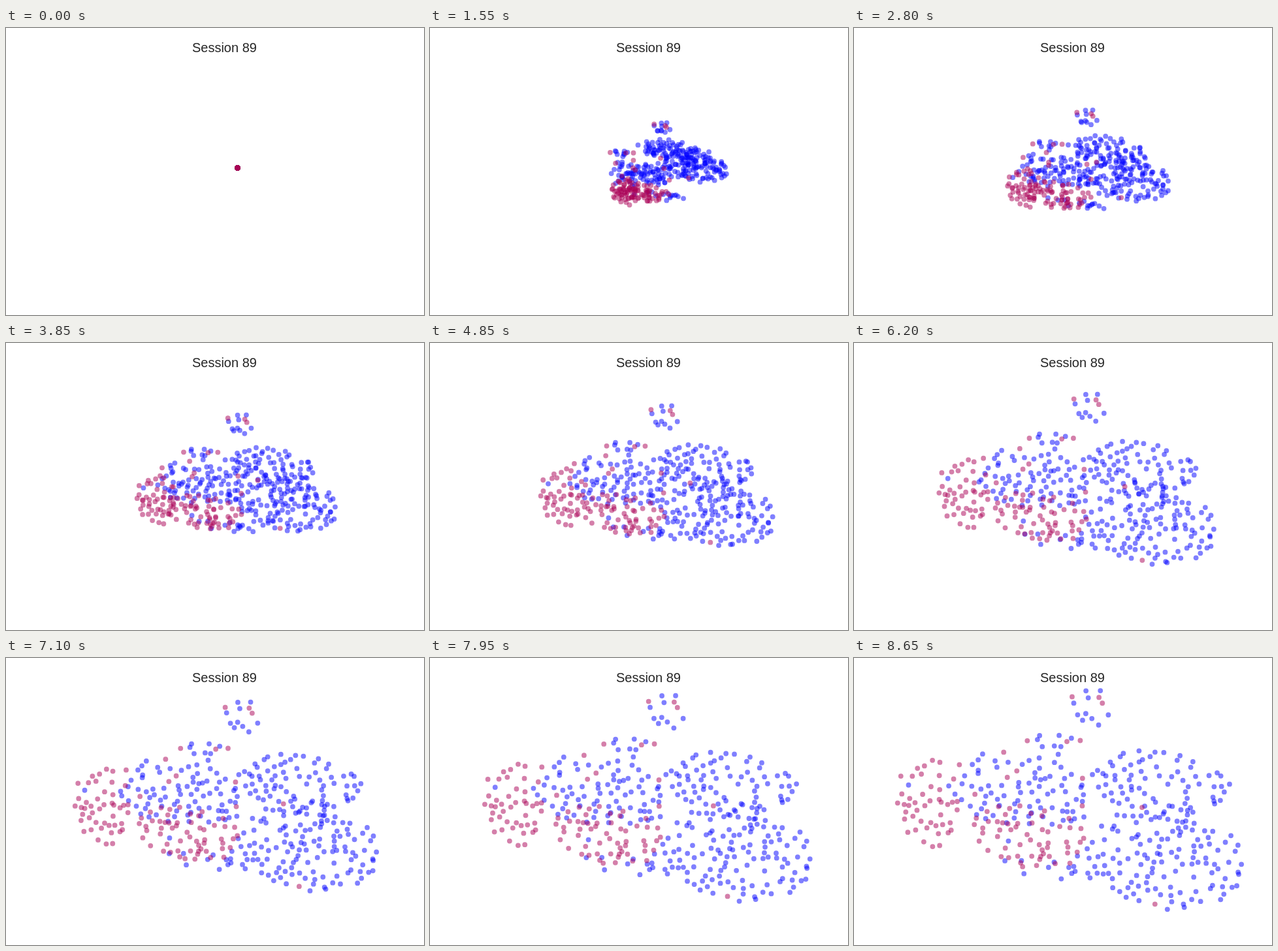
These frames come from a looping animation (640x440 px, 8700 ms). An HTML page with a canvas:

```html
<!DOCTYPE html>
<html lang="en">
<head>
<meta charset="utf-8">
<title>Session 89</title>
<style>
  html, body { margin: 0; width: 100%; height: 100%; overflow: hidden; background: #fff; }
  canvas { display: block; }
</style>
</head>
<body>
<canvas id="stage" width="640" height="440"></canvas>
<script>
const ctx = document.getElementById('stage').getContext('2d');
const LOOP = 8700, STEP = 50, HOLD = 150;
const SETTLED = 1550, END = 8650;
const ORIGIN = { x: 354.5, y: 214.5 };
const BLUE = '#0000ff', PINK = '#aa0055';
const DENSITY = 0.013, TILT = 0.13;
const EARLY_SCALE = { x: 0.42, y: 0.3 };

// Each cluster drifts between two centres and grows to an ellipse of the given radii.
const clusters = [
  { pink: 0.22, from: [357, 153], to: [366, 75], radii: [36, 28] },
  { pink: 0.3, from: [295, 192], to: [311, 131], radii: [48, 17] },
  { pink: 0.96, from: [298, 249], to: [113, 221], radii: [51, 71] },
  { pink: 0.97, from: [325, 252], to: [268, 272], radii: [95, 47] },
  { pink: 0.08, from: [322, 223], to: [256, 203], radii: [112, 58] },
  { pink: 0.08, from: [358, 256], to: [294, 324], radii: [75, 13] },
  { pink: 0.015, from: [367, 189], to: [472, 196], radii: [108, 53] },
  { pink: 0.01, from: [406, 211], to: [478, 306], radii: [122, 80] },
];

let seed = 89;
function random() {
  seed = (seed * 1664525 + 1013904223) % 4294967296;
  return seed / 4294967296;
}

function randomInDisc() {
  const r = Math.sqrt(random()), a = random() * Math.PI * 2;
  return { x: r * Math.cos(a), y: r * Math.sin(a) };
}

// The best of a few candidates keeps the dots loosely spaced.
function spacedInDisc(taken) {
  const gap = p => Math.min(...taken.map(q => Math.hypot(p.x - q.x, p.y - q.y)));
  const [best] = Array.from({ length: 3 }, randomInDisc)
    .map(p => ({ p, gap: gap(p) }))
    .sort((a, b) => b.gap - a.gap);
  taken.push(best.p);
  return best.p;
}

function place([cx, cy], [rx, ry], p) {
  return { x: cx + rx * p.x, y: cy + ry * p.y + TILT * rx * p.x };
}

function makeDots({ pink, from, to, radii: [rx, ry] }) {
  const count = Math.round(DENSITY * rx * ry), taken = [];
  return Array.from({ length: count }, (_, i) => {
    const p = spacedInDisc(taken), drift = randomInDisc();
    const pull = Math.hypot(p.x, p.y) ** 0.2; // denser centres early on
    const early = { x: p.x * pull + drift.x * 0.2, y: p.y * pull + drift.y * 0.2 };
    return {
      start: place(from, [rx * EARLY_SCALE.x, ry * EARLY_SCALE.y], early),
      end: place(to, [rx, ry], p),
      // Spreads the pink share evenly over the cluster.
      color: Math.floor((i + 0.5) * pink + 0.5) > Math.floor((i - 0.5) * pink + 0.5) ? PINK : BLUE,
    };
  });
}

const dots = clusters.flatMap(makeDots).sort((a, b) => (a.color === PINK) - (b.color === PINK));

const mix = (a, b, f) => a + (b - a) * f;

function draw(time) {
  const t = Math.floor(time / STEP) * STEP;
  const burst = t < HOLD ? 0 : 1 / (1 + Math.exp((450 - t) / 60));
  const f = (t - SETTLED) / (END - SETTLED);
  const spread = f + 0.2 * f * (1 - f);

  ctx.globalAlpha = 1;
  ctx.fillStyle = '#fff';
  ctx.fillRect(0, 0, 640, 440);
  ctx.fillStyle = '#262626';
  ctx.font = '20px "Liberation Sans", Arial, sans-serif';
  ctx.textAlign = 'center';
  ctx.fillText('Session 89', 334.4, 37);

  ctx.globalAlpha = 0.5;
  for (const { start, end, color } of dots) {
    const x = mix(ORIGIN.x, mix(start.x, end.x, spread), burst);
    const y = mix(ORIGIN.y, mix(start.y, end.y, spread), burst);
    ctx.fillStyle = color;
    ctx.beginPath();
    ctx.arc(x, y, 3.9, 0, Math.PI * 2);
    ctx.fill();
  }
}

const startTime = performance.now();
function tick() {
  draw((performance.now() - startTime) % LOOP);
  requestAnimationFrame(tick);
}
tick();
</script>
</body>
</html>
```
